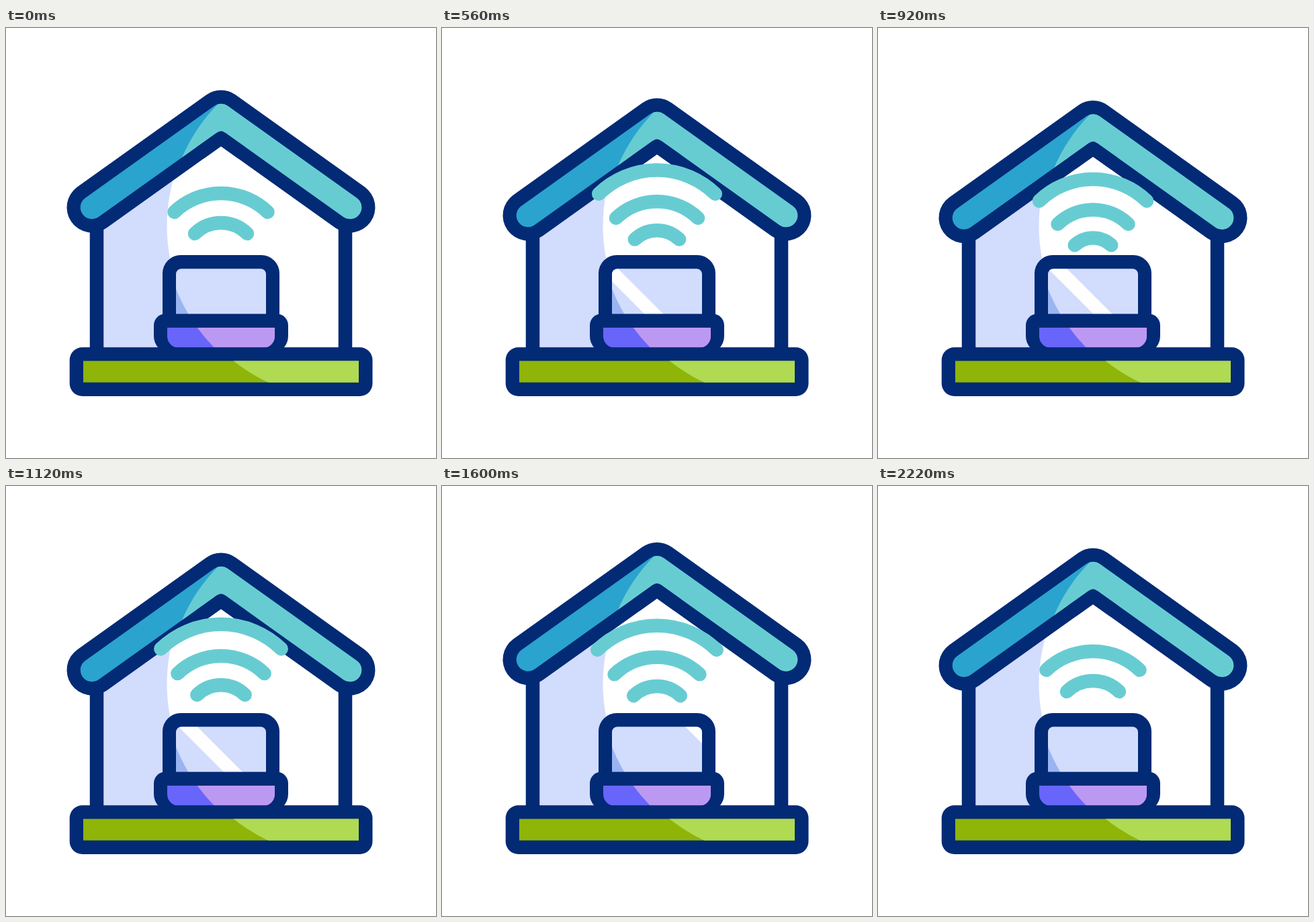
Write an HTML page with a canvas that moves like this. It is 640 px wide and 640 px high and loops after 2.4 s.

```html
<!DOCTYPE html>
<html lang="en">
<head>
<meta charset="utf-8">
<title>Connected home</title>
<style>
  html, body { margin: 0; width: 100%; height: 100%; overflow: hidden; background: #fff; }
  canvas { display: block; width: 640px; height: 640px; }
</style>
</head>
<body>
<canvas id="stage"></canvas>
<script>
const LOOP = 2400, START = 200, END = 2200, PULSE = 500;
const NAVY = '#032a75', TEAL = '#67ccd2', BLUE = '#2aa3cf', LAVENDER = '#d2dcfd',
      SHADE = '#9ab4f1', VIOLET = '#6865fa', LILAC = '#bb99f2',
      GREEN = '#8fb508', LIME = '#b0da52', WHITE = '#fff';

const canvas = document.getElementById('stage');
const ctx = canvas.getContext('2d');
const dpr = window.devicePixelRatio || 1;
canvas.width = canvas.height = 640 * dpr;

const clamp = v => Math.min(1, Math.max(0, v));
const mix = (a, b, p) => a + (b - a) * p;
const smooth = p => p * p * (3 - 2 * p);

// Roof: [from ms, to ms, start offset, end offset]
const ROOF_MOVES = [[200, 735, 0, 16], [868, 1484, 16, -8.6], [1605, 2125, -8.6, 0]];
function roofOffset(t) {
  let y = 0;
  for (const [t0, t1, a, b] of ROOF_MOVES) {
    if (t >= t0) y = mix(a, b, smooth(clamp((t - t0) / (t1 - t0))));
  }
  return y;
}

// Each signal arc grows into the next: [apex y, half width, end y]
const ARCS = [[330.2, 18, 337], [290, 39, 306], [246, 69.5, 274], [198.3, 93.5, 236.5]];

function box(x, y, w, h, r) {
  const p = new Path2D();
  p.roundRect(x, y, w, h, r);
  return p;
}

function fill(path, color) {
  ctx.fillStyle = color;
  ctx.fill(path);
}

// Fills a shape in its shaded colour, then lights the part inside a large circle
function shaded(path, dark, light, shift) {
  ctx.save();
  fill(path, dark);
  ctx.clip(path);
  const lit = new Path2D();
  lit.arc(497.5 + shift, 294.5, 258, 0, 2 * Math.PI);
  fill(lit, light);
  ctx.restore();
}

const TILT = Math.atan2(137, 192), QUARTER = Math.PI / 2;
function chevron(r) {
  const p = new Path2D();
  p.arc(128, 267, r, QUARTER - TILT, 3 * QUARTER - TILT);
  p.arc(320, 130, r, 3 * QUARTER - TILT, 3 * QUARTER + TILT);
  p.arc(512, 267, r, 3 * QUARTER + TILT, 5 * QUARTER + TILT);
  p.lineTo(320, 130 + r / Math.cos(TILT));
  p.closePath();
  return p;
}
const ROOF_OUTER = chevron(37.5), ROOF_INNER = chevron(17.3);

function line(points, color, width) {
  ctx.beginPath();
  for (const [x, y] of points) ctx.lineTo(x, y);
  ctx.strokeStyle = color;
  ctx.lineWidth = width;
  ctx.stroke();
}

function drawWalls(y) {
  const wall = new Path2D();
  wall.moveTo(135, 485);
  wall.lineTo(135, 296 + y);
  wall.lineTo(320, 164 + y);
  wall.lineTo(320, 485);
  wall.closePath();
  shaded(wall, LAVENDER, WHITE, 0);
  for (const x of [135, 505]) line([[x, 280 + y], [x, 485]], NAVY, 20.5);
}

function drawRoof(y) {
  ctx.save();
  ctx.translate(0, y);
  fill(ROOF_OUTER, NAVY);
  shaded(ROOF_INNER, BLUE, TEAL, 1.5);
  // rounded ridge on the underside
  fill(box(314, 147, 12, 13, 0), TEAL);
  line([[290, 185.2], [320, 163.8], [350, 185.2]], NAVY, 20);
  ctx.restore();
}

function drawSignal(t) {
  const u = t > START && t < END ? (t - START) / PULSE % 1 : 0;
  const alpha = [clamp(u / 0.1), 1, clamp((1 - u) / 0.1)];
  if (u === 0) alpha[2] = 1;
  const count = u === 0 ? 2 : 3;
  ctx.strokeStyle = TEAL;
  ctx.lineWidth = 20.5;
  for (let i = 3 - count; i < 3; i++) {
    const [top, half, end] = ARCS[i].map((v, k) => mix(v, ARCS[i + 1][k], u));
    const rise = end - top;
    const r = (half * half + rise * rise) / (2 * rise);
    const spread = Math.asin(half / r);
    ctx.globalAlpha = alpha[i];
    ctx.beginPath();
    ctx.arc(320, top + r, r, -QUARTER - spread, -QUARTER + spread);
    ctx.stroke();
  }
  ctx.globalAlpha = 1;
}

const SCREEN = box(253, 358.5, 134, 80, 8);
function drawLaptop(t) {
  fill(box(233, 338, 174, 110, [27, 27, 0, 0]), NAVY);
  shaded(SCREEN, SHADE, LAVENDER, -4);

  // glare sweeps in fast, lingers, then leaves fast
  if (t > START && t < END) {
    const k = t - 930;
    const x = 358.5 - 105 + 0.0048 * k + 3.49e-7 * k ** 3;
    ctx.save();
    ctx.clip(SCREEN);
    const glare = new Path2D();
    glare.moveTo(x, 358.5);
    glare.lineTo(x + 28, 358.5);
    glare.lineTo(x + 108, 438.5);
    glare.lineTo(x + 80, 438.5);
    glare.closePath();
    fill(glare, WHITE);
    ctx.restore();
  }

  fill(box(220, 425.5, 200, 60, [17, 17, 27, 27]), NAVY);
  shaded(box(240, 446, 160, 30, [0, 0, 17, 17]), VIOLET, LILAC, -4);
}

function drawGround() {
  fill(box(94.7, 475.3, 450.8, 72.7, 19), NAVY);
  shaded(box(115, 495.5, 410, 32, 0), GREEN, LIME, 3);
}

function draw(t) {
  ctx.setTransform(dpr, 0, 0, dpr, 0, 0);
  ctx.lineCap = ctx.lineJoin = 'round';
  ctx.fillStyle = WHITE;
  ctx.fillRect(0, 0, 640, 640);
  const y = roofOffset(t);
  drawWalls(y);
  drawRoof(y);
  drawSignal(t);
  drawLaptop(t);
  drawGround();
}

const begin = performance.now();
function tick() {
  draw((performance.now() - begin) % LOOP);
  requestAnimationFrame(tick);
}
tick();
</script>
</body>
</html>
```
